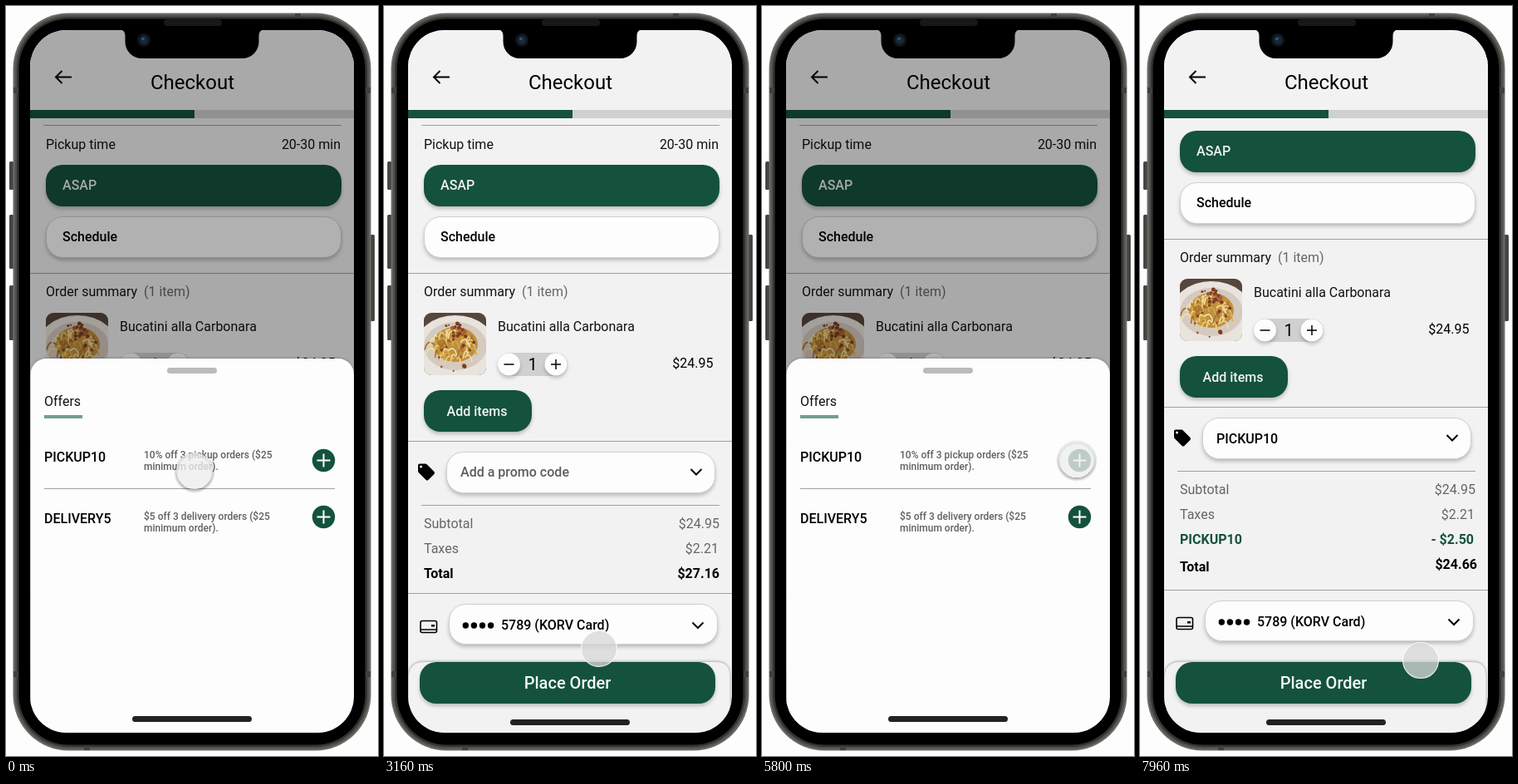
Write an HTML page that moves like this. It is 448 by 902 pixels and loops after 8000 ms.

```html
<!DOCTYPE html>
<html lang="en">
<head>
<meta charset="utf-8">
<title>Checkout promo code</title>
<style>
  html, body { margin: 0; width: 100%; height: 100%; overflow: hidden; background: #fdfdfd; }
  svg { display: block; width: 100%; height: 100%; font: 400 16px Roboto, sans-serif; }
  .raised { filter: drop-shadow(0 3px 2px rgba(0, 0, 0, .22)); }
  .medium { font-weight: 500; }
  .bold { font-weight: 700; }
  .small { font-size: 12px; }
  .line { fill: none; stroke: #000; stroke-width: 2; }
</style>
</head>
<body>
<svg id="stage" viewBox="0 0 448 902"></svg>
<script>
const GREEN = '#14523d', PAGE = '#f2f2f2', GREY = '#666';

const rect = (x, y, w, h, r, fill, extra = '') =>
  `<rect x="${x}" y="${y}" width="${w}" height="${h}" rx="${r}" fill="${fill}" ${extra}/>`;
const circle = (x, y, r, fill, extra = '') =>
  `<circle cx="${x}" cy="${y}" r="${r}" fill="${fill}" ${extra}/>`;
const ellipse = (x, y, rx, ry, fill) =>
  `<ellipse cx="${x}" cy="${y}" rx="${rx}" ry="${ry}" fill="${fill}"/>`;
const text = (x, y, label, cls = '', fill = '#000', anchor = 'start', size = '') =>
  `<text x="${x}" y="${y}" class="${cls}" fill="${fill}" text-anchor="${anchor}"` +
  `${size && ` style="font-size:${size}px"`}>${label}</text>`;
const rule = (x1, x2, y) => rect(x1, y, x2 - x1, 1, 0, '#a0a0a0');
const path = (d, extra = '') => `<path class="line" d="${d}" ${extra}/>`;
const chevron = (x, y) => path(`M${x - 6.5} ${y - 3.5}l6.5 6.5 6.5-6.5`);
const group = (id, content, extra = '') => `<g id="${id}" ${extra}>${content}</g>`;

const greenButton = (x, y, w) => rect(x, y, w, 50, 20, GREEN, 'class="raised"');
const whiteField = (x, y, w, h) =>
  rect(x + .5, y + .5, w - 1, h - 1, 20, '#fdfdfd', 'stroke="#cfcfcf" class="raised"');
const homeBar = y => rect(152, y, 144, 7, 3.5, '#222');
const row = (y, label, value, cls = '', fill = GREY, right = 404, valueY = y) =>
  text(48, y, label, cls, fill) + text(right, valueY, value, cls, fill, 'end');

function seeded(seed) {
  return () => (seed = (seed * 16807) % 2147483647) / 2147483647;
}

function dish() {
  const rand = seeded(71);
  const spot = (cx, cy, spread) => {
    const a = rand() * 6.283, d = Math.sqrt(rand()) * spread;
    return [cx + Math.cos(a) * d, cy + Math.sin(a) * d * .75];
  };
  let out = rect(48, 369, 75, 75, 0, '#57463c') +
    ellipse(86, 413, 50, 41, '#e9e3dd') + ellipse(86, 409, 38, 29, '#d5cabf') +
    ellipse(86, 407, 27, 21, '#bf9040');
  for (let i = 0; i < 46; i++) {
    const [x, y] = spot(85, 408, 25);
    const dx = rand() * 20 - 10, tone = ['#efd287', '#a4702a', '#d9aa45', '#f3e0a4'][i % 4];
    out += `<path d="M${x} ${y}q${dx} -8 ${dx * 1.4} 6" fill="none" stroke="${tone}" stroke-width="1.500"/>`;
  }
  for (let i = 0; i < 36; i++) {
    const [x, y] = i < 20 ? spot(84, 389, 14) : spot(88, 416, 32);
    out += circle(x, y, 1 + rand() * 1.6, i % 3 ? '#7d3c20' : '#a85c36');
  }
  return `<g clip-path="url(#photo)">${out}</g>`;
}

function phone() {
  const button = (x, y, h) => rect(x, y, 5.5, h, 1.5, '#454643');
  const marks = [[9, 98, 6, 7], [433, 98, 6, 7], [9, 800, 6, 7], [433, 800, 6, 7], [348, 9, 7, 5], [94, 890, 7, 5]];
  return button(4, 187, 34) + button(4, 251, 65) + button(4, 336, 66) + button(438.5, 275, 104) +
    rect(8.5, 8.5, 431, 887, 67, '#6b6c67') +
    rect(10.5, 10.5, 427, 883, 65, '#51524e') +
    rect(13, 13, 422, 878, 62.5, '#33342f') +
    marks.map(m => rect(...m, 0, '#40413d')).join('') +
    rect(15.5, 15.5, 417, 873, 60, '#000');
}

function notch() {
  return '<path d="M137 28Q143.500 29 143.500 36V43A20 20 0 0 0 163.500 63H284.500A20 20 0 0 0 304.500 43V36Q304.500 29 311 28Z"/>' +
    rect(190, 16, 70, 8, 4, '#181818') +
    circle(166, 41, 8, '#10151b') + circle(166, 41, 5, '#17283a') + circle(165, 39.5, 1.8, '#39566f');
}

function header() {
  return rect(29, 29, 390, 106, 0, PAGE) +
    rect(29, 125, 390, 10, 0, '#d0d0d0') + rect(29, 125, 198, 10, 0, GREEN) +
    path('M79 85.500H60M67.500 78l-7.500 7.500 7.500 7.500') +
    text(224.5, 100, 'Checkout', '', '#000', 'middle', 24);
}

function tag() {
  return '<path transform="translate(39 548.500)" fill-rule="evenodd" d="M21.400 11.600l-9-9Q11.800 2 11 2H4Q2 2 2 4' +
    'v7q0 .8.6 1.400l9 9q1.400 1.200 2.800 0l7-7q1.200-1.400 0-2.800zM5.500 7a1.500 1.500 0 1 1 0-3 1.500 1.500 0 0 1 0 3z"/>';
}

function order() {
  return rule(45, 404, 143) +
    row(172, 'Pickup time', '20-30 min', '', '#111', 403) +
    greenButton(48, 191, 356) + text(68, 221, 'ASAP', 'medium', '#f2f2f2') +
    whiteField(48, 253, 356, 50) + text(68, 283, 'Schedule', 'medium') +
    rule(29, 419, 321) +
    text(48, 349, 'Order summary', '', '#111') + text(166, 349, '(1 item)', '', GREY) +
    dish() + text(137, 391, 'Bucatini alla Carbonara', '', '#111') +
    rect(137, 417, 84, 28, 14, '#d0d0d0') +
    circle(150.5, 431, 13.5, '#fdfdfd', 'class="raised"') + circle(207, 431, 13.5, '#fdfdfd', 'class="raised"') +
    path('M144.500 431h12M201 431h12M207 425v12', 'style="stroke-width:1.5"') +
    text(179, 438, '1', '', '#000', 'middle', 20) +
    text(396.5, 435, '$24.95', '', '#000', 'end') +
    greenButton(48, 462, 130) + text(112, 493, 'Add items', 'medium', '#f2f2f2', 'middle') +
    rule(29, 419, 523) + tag() +
    whiteField(75, 536, 324, 50) + chevron(376, 560.5) +
    rule(45, 404, 600) + row(628, 'Subtotal', '$24.95') + row(658, 'Taxes', '$2.21', '', GREY, 403);
}

function payment() {
  const dots = [0, 1, 2, 3].map(i => circle(98.3 + i * 10.1, 745, 3.7, '#000')).join('');
  return rule(29, 419, 706) +
    rect(44, 739.5, 19.5, 14, 2, 'none', 'stroke="#000" stroke-width="1.600"') +
    path('M44 750h19.500', 'style="stroke-width:1.5"') + rect(57, 744, 4, 2.5, 0, '#000') +
    whiteField(78, 719, 324, 49) + dots + text(141, 750, '5789 (KORV Card)', 'medium') +
    chevron(378, 745);
}

function bottomBar() {
  return '<path d="M29 900V805Q31 788.500 48 788.500H400Q417 788.500 417 805V900Z" ' +
    `fill="${PAGE}" stroke="#c4c4c4" style="filter:drop-shadow(0 -1px 1px rgba(0,0,0,.15))"/>` +
    greenButton(43, 789, 356) + text(221, 821, 'Place Order', 'medium', '#f7f7f7', 'middle', 20) +
    homeBar(858);
}

function sheet() {
  const offer = (y, code, terms, plusY) =>
    text(46, y, code, 'medium') +
    text(166, y - 4, terms, 'small medium', '#606060') +
    text(166, y + 10, 'minimum order).', 'small medium', '#606060') +
    circle(382.5, plusY, 13.7, GREEN) +
    path(`M374.500 ${plusY}h16M382.500 ${plusY - 8}v16`, 'style="stroke:#fff"');
  return rect(29.5, 424, 389.5, 500, 19, '#fdfdfd', 'style="filter:drop-shadow(0 -1px 1px rgba(0,0,0,.18))"') +
    rect(194, 435, 60, 7, 3.5, '#bababa') +
    text(46, 481, 'Offers', '', '#111') + rect(46, 492, 46, 4, 0, '#729e8e') +
    offer(548, 'PICKUP10', '10% off 3 pickup orders ($25', 546.5) +
    rule(46, 396, 580) +
    offer(622, 'DELIVERY5', '$5 off 3 delivery orders ($25', 614.5) +
    homeBar(854);
}

const plain = text(92, 566, 'Add a promo code', 'medium', '#5c5c5c') +
  row(688, 'Total', '$27.16', 'bold', '#000');
const discounted = text(92, 567, 'PICKUP10', 'medium') +
  row(688, 'PICKUP10', '- $2.50', 'bold', GREEN, 402) +
  row(721, 'Total', '$24.66', 'bold', '#000', 406, 718);

document.getElementById('stage').innerHTML =
  `<defs>
    <clipPath id="screen">${rect(29, 29, 390, 845, 44, '#000')}</clipPath>
    <clipPath id="photo">${rect(48, 369, 75, 75, 9, '#000')}</clipPath>
    <radialGradient id="halo">
      <stop offset=".8" stop-opacity="0"/><stop offset=".82" stop-opacity=".3"/><stop offset="1" stop-opacity="0"/>
    </radialGradient>
  </defs>` + phone() +
  `<g clip-path="url(#screen)">` +
    rect(29, 29, 390, 846, 0, PAGE) +
    group('content', order() + group('plain', plain) + group('discounted', discounted) + group('payment', payment())) +
    header() + bottomBar() +
    rect(29, 29, 390, 846, 0, '#000', 'id="dim"') +
    group('sheet', sheet()) +
  '</g>' + notch() +
  group('cursor',
    group('idle', circle(0, 0, 21.5, '#d8d8d8', 'fill-opacity=".76" stroke="#fff" stroke-opacity=".8" stroke-width="1.200"')) +
    group('tapped', circle(0, 2, 25, 'url(#halo)', 'id="shadow"') + circle(0, 0, 22, '#efefef', 'fill-opacity=".78"')));

const part = Object.fromEntries(
  ['content', 'plain', 'discounted', 'payment', 'dim', 'sheet', 'cursor', 'idle', 'tapped', 'shadow']
    .map(id => [id, document.getElementById(id)]));

const LOOP = 8000, SLIDE = 300, TRAVEL = 450;
const CLOSE_1 = 1389, OPEN = 4593.5, CLOSE_2 = 5960;

// Each step: time, x, y
const cursorSteps = [
  [0, 227, 559], [700, 232, 552], [1260, 235, 548], [1480, 238, 690], [1750, 242, 725],
  [2500, 257, 770], [3200, 259, 773], [3500, 259, 773], [4250, 223, 571], [5150, 223, 571],
  [5750, 379, 545], [6550, 379, 545], [7250, 338, 787], [8000, 338, 787]
];
const scrollSteps = [[0, 0], [7150, 0], [7500, 41], [8000, 41]];

const clamp = v => Math.min(1, Math.max(0, v));
const smooth = p => p * p * (3 - 2 * p);
const slide = (t, start) => 1 - (1 - clamp((t - start) / SLIDE)) ** 1.7;

function at(steps, t) {
  const i = steps.findIndex((s, k) => k && t <= s[0]);
  const [a, b] = [steps[i - 1], steps[i]];
  const p = smooth((t - a[0]) / (b[0] - a[0]));
  return a.slice(1).map((v, k) => v + (b[k + 1] - v) * p);
}

const move = (el, x, y) => el.setAttribute('transform', `translate(${x} ${y})`);
const show = (el, on) => el.setAttribute('display', on ? 'inline' : 'none');

function draw(t) {
  const open = 1 - slide(t, CLOSE_1) + slide(t, OPEN) - slide(t, CLOSE_2);
  const applied = t >= CLOSE_2;
  const dragging = t > 1300 && t < 1640;
  const tapped = t < 1640 || (t > 4450 && t < 6600);

  move(part.sheet, 0, TRAVEL * (1 - open));
  show(part.sheet, open > .001);
  part.dim.setAttribute('opacity', .3 * open);

  show(part.plain, !applied);
  show(part.discounted, applied);
  move(part.payment, 0, applied ? 37 : 0);
  move(part.content, 0, -at(scrollSteps, t)[0]);

  move(part.cursor, ...at(cursorSteps, t));
  part.cursor.setAttribute('opacity', dragging ? .7 : 1);
  show(part.idle, !tapped);
  show(part.tapped, tapped);
  show(part.shadow, !dragging);
}

const begin = performance.now();
function tick() {
  draw((performance.now() - begin) % LOOP);
  requestAnimationFrame(tick);
}
tick();
</script>
</body>
</html>
```
